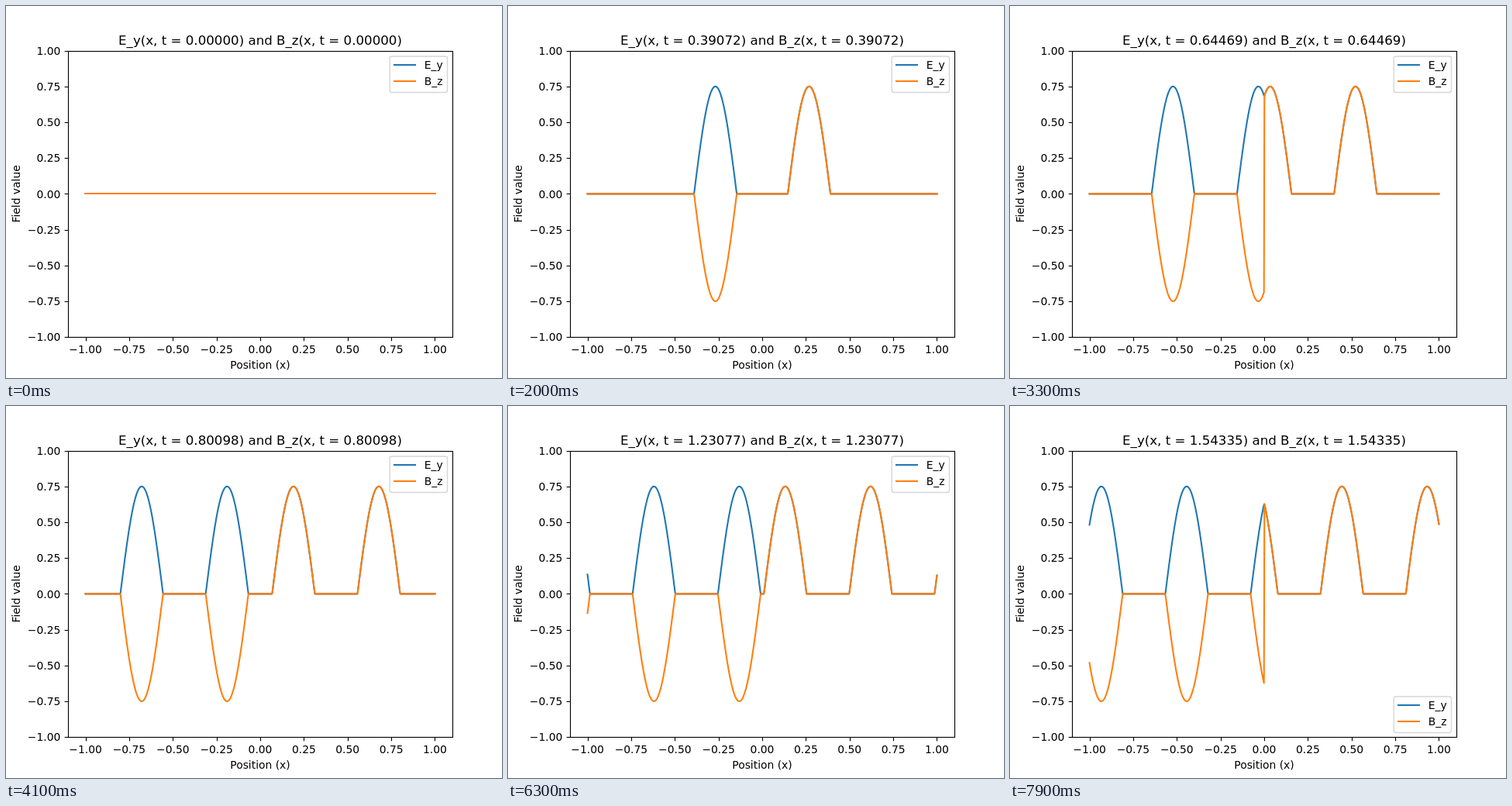
These frames come from a looping animation (640x480 px, 8000 ms). An HTML page with a canvas:

```html
<!DOCTYPE html>
<html lang="en">
<head>
<meta charset="utf-8">
<title>Travelling field pulses</title>
<style>
html, body { margin: 0; width: 100%; height: 100%; overflow: hidden; background: #fff; }
canvas { display: block; }
</style>
</head>
<body>
<canvas id="plot" width="640" height="480"></canvas>
<script>
const ctx = document.getElementById('plot').getContext('2d');
const BLUE = '#1f77b4', ORANGE = '#ff7f0e';
const FRAME_MS = 100, FRAMES = 80, DT = 16 / 819;
const PERIOD = 25 * DT, CELLS = 819, LEFT_DELAY = 0.0007;
const LINE = 2.083, THIN = 1.111;

const px = x => 328 + x * 496 / 2.2;
const py = y => 242.4 - y * 184.8;
const snap = v => Math.floor(v + 0.5) + 0.5;

function text(str, x, y, align = 'center', size = 13.889) {
  ctx.font = `${size}px "DejaVu Sans", sans-serif`;
  ctx.textAlign = align;
  ctx.fillStyle = '#000';
  ctx.fillText(str, x, y);
}

function stroke(points, color, width, cap = 'butt') {
  ctx.beginPath();
  for (const [x, y] of points) ctx.lineTo(x, y);
  ctx.strokeStyle = color;
  ctx.lineWidth = width;
  ctx.lineCap = cap;
  ctx.lineJoin = 'round';
  ctx.stroke();
}

// Half-rectified sine emitted from x = 0 in both directions
function field(x, t) {
  const age = t - Math.abs(x) - (x < 0 ? LEFT_DELAY : 0);
  return age > 0 ? 0.75 * Math.max(0, Math.sin(2 * Math.PI * age / PERIOD)) : 0;
}

function curve(t, color, leftSign) {
  const points = [];
  for (let i = 0; i <= CELLS; i++) {
    const x = -1 + 2 * i / CELLS;
    const y = field(x, t) * (x < 0 ? leftSign : 1);
    points.push([px(x), t ? py(y) : 242]);
  }
  stroke(points, color, LINE, 'square');
}

function axes() {
  for (let i = -4; i <= 4; i++) {
    const v = i / 4, x = snap(px(v)), y = snap(py(v));
    const label = v.toFixed(2).replace('-', '\u2212');
    stroke([[x, 427.5], [x, 432.4]], '#000', THIN);
    stroke([[80.5, y], [75.6, y]], '#000', THIN);
    text(label, px(v), 448);
    text(label, 70.3, Math.round(py(v) + 5.2), 'right');
  }
  ctx.strokeStyle = '#000';
  ctx.lineWidth = THIN;
  ctx.lineJoin = 'miter';
  ctx.strokeRect(80.5, 58.5, 496, 369);
  text('Position (x)', 328, 468);
  ctx.save();
  ctx.translate(18, 242.4);
  ctx.rotate(-Math.PI / 2);
  text('Field value', 0, 0);
  ctx.restore();
}

function legend(dy) {
  ctx.beginPath();
  ctx.roundRect(495.2, 65 + dy, 74.3, 46.5, 2.8);
  ctx.fillStyle = 'rgba(255,255,255,0.8)';
  ctx.fill();
  ctx.strokeStyle = 'rgba(204,204,204,0.8)';
  ctx.lineWidth = 1.389;
  ctx.stroke();
  [['E_y', BLUE], ['B_z', ORANGE]].forEach(([name, color], i) => {
    const y = 76 + 21 * i + dy;
    stroke([[501, y], [528, y]], color, LINE, 'square');
    text(name, 539.7, y + 5, 'left');
  });
}

function draw(frame) {
  const t = frame * DT, time = t.toFixed(5);
  ctx.fillStyle = '#fff';
  ctx.fillRect(0, 0, 640, 480);
  curve(t, BLUE, 1);
  curve(t, ORANGE, -1);
  axes();
  text(`E_y(x, t = ${time}) and B_z(x, t = ${time})`, 328, 50, 'center', 16.667);
  // The legend moves down while a crest passes the upper corner
  const crowded = frame >= 43 && (frame - 43) % 25 < 16;
  legend(crowded ? 310 : 0);
}

const start = performance.now();
function tick() {
  draw(Math.floor((performance.now() - start) / FRAME_MS) % FRAMES);
  requestAnimationFrame(tick);
}
tick();
</script>
</body>
</html>
```
